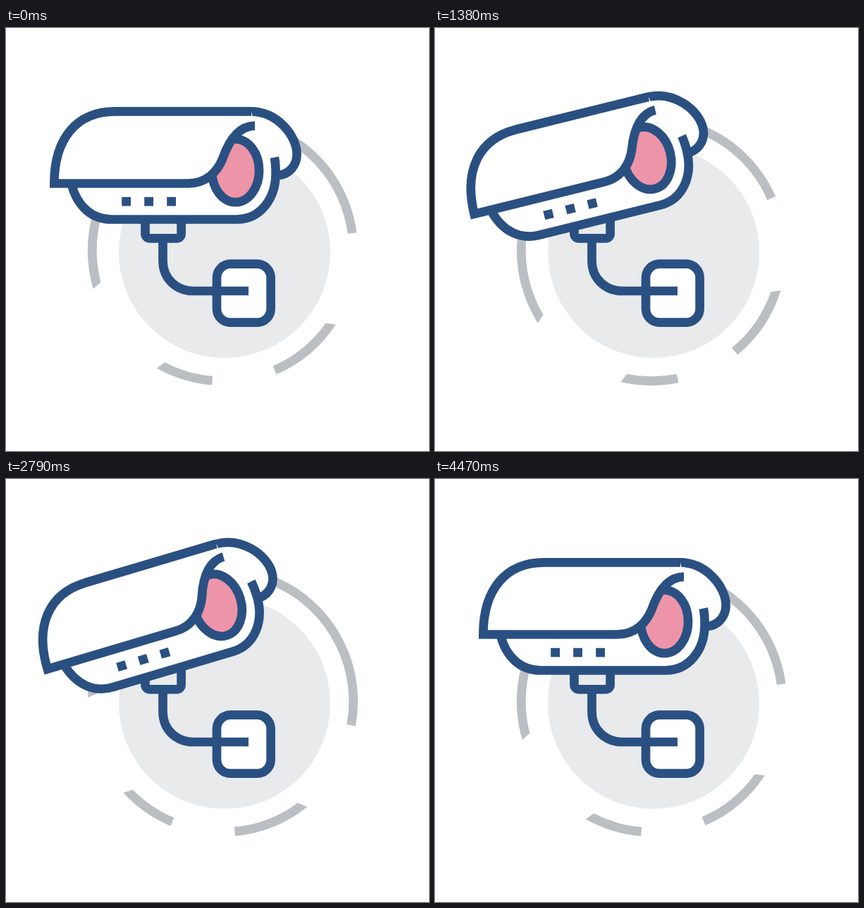
Write an HTML page that moves like this. It is 600 px wide and 600 px high and loops after 4500 ms.

```html
<!DOCTYPE html>
<html lang="en">
<head>
<meta charset="utf-8">
<title>Security camera</title>
<style>
  html, body { margin: 0; width: 100%; height: 100%; overflow: hidden; background: #fff; }
  svg { display: block; width: 100%; height: 100%; }
  .line { fill: none; stroke: #2a5082; stroke-width: 12.7; }
  .solid { fill: #fff; }
  .lens { fill: #ee94a9; }
</style>
</head>
<body>
<svg viewBox="0 0 600 600">
  <circle cx="310" cy="318" r="150" fill="#e8eaec"/>
  <path id="ring" fill="#bbbfc4"/>

  <g class="line">
    <path d="M197.5 255V292a6.4 6.4 0 0 0 6.4 6.4h38.3a6.4 6.4 0 0 0 6.4-6.4V255"/>
    <rect class="solid" x="299" y="334.7" width="76.6" height="83" rx="19.5"/>
    <path d="M222.5 300V330C222.5 355 241 373 266 373H344"/>
  </g>

  <g id="camera" class="line">
    <path class="solid" d="M155 118.4H347C385 118.4 412.6 153 412.6 179C412.6 195 402 207 387 209"/>
    <path class="solid" d="M93 222C101 253 122 271.5 150 271.5H327C360 271.5 382.6 243 382.6 206C382.6 197 382 190 380.8 183.5"/>
    <ellipse class="lens" cx="325.5" cy="202.3" rx="33.6" ry="44.8"/>
    <path class="solid" d="M348 118.4H155C100 118.4 68.4 157 68.4 220.5H258C285 220.5 300 203 307 186C315 163 328 139 353 138.7"/>
    <path d="M164.2 246.2h76.8" stroke-dasharray="12.8 19.2"/>
  </g>
</svg>
<script>
const LOOP = 4500;
const STEP = 30;
const CENTER = [307.5, 315.5];
const ring = document.getElementById('ring');
const camera = document.getElementById('camera');

// Straight moves from rest, through the turning points [time, ...values], back to rest
function swing(start, end, turns) {
  const rest = turns[0].slice(1).fill(0);
  const keys = [[start, ...rest], ...turns, [end, ...rest]];
  return t => {
    const i = keys.findIndex(key => key[0] > t);
    if (i < 1) return rest;
    const [t0, ...from] = keys[i - 1];
    const [t1, ...to] = keys[i];
    return from.map((v, n) => v + (to[n] - v) * (t - t0) / (t1 - t0));
  };
}

// angle, dx, dy
const cameraPose = swing(150, 4330, [
  [735, 24.5, 20, 13], [1500, -21, -32, 1], [1930, -1, -6, 2],
  [2765, -17.2, -24.8, 1], [3850, 12.5, 12.4, 9.5]
]);
const ringAngle = swing(0, 4470, [
  [604, -29.7], [1131, -3.8], [1737, -33.5], [3005, 28.7], [3760, -34.9]
]);

function polar(radius, degrees) {
  const a = degrees * Math.PI / 180;
  return [CENTER[0] + radius * Math.cos(a), CENTER[1] + radius * Math.sin(a)];
}

// Piece of the ring; the inner edge is shortened where an end is cut at a slant
function band(start, end, cutStart, cutEnd) {
  const outer = 191.6, inner = 178.8;
  const large = end - start > 180 ? 1 : 0;
  return `M${polar(outer, start)}A${outer} ${outer} 0 ${large} 1 ${polar(outer, end)}` +
    `L${polar(inner, end - cutEnd)}A${inner} ${inner} 0 ${large} 0 ${polar(inner, start + cutStart)}Z`;
}

ring.setAttribute('d',
  band(163.5, 352.4, 1.9, 0) + band(33.2, 66.6, 2.1, 0) + band(94.6, 119.3, 0, 1.9));

function draw() {
  const t = Math.floor(performance.now() % LOOP / STEP) * STEP;
  const [angle, dx, dy] = cameraPose(t);
  camera.setAttribute('transform', `translate(${dx} ${dy}) rotate(${angle} 240.5 195)`);
  ring.setAttribute('transform', `rotate(${ringAngle(t)} ${CENTER})`);
  requestAnimationFrame(draw);
}
draw();
</script>
</body>
</html>
```
